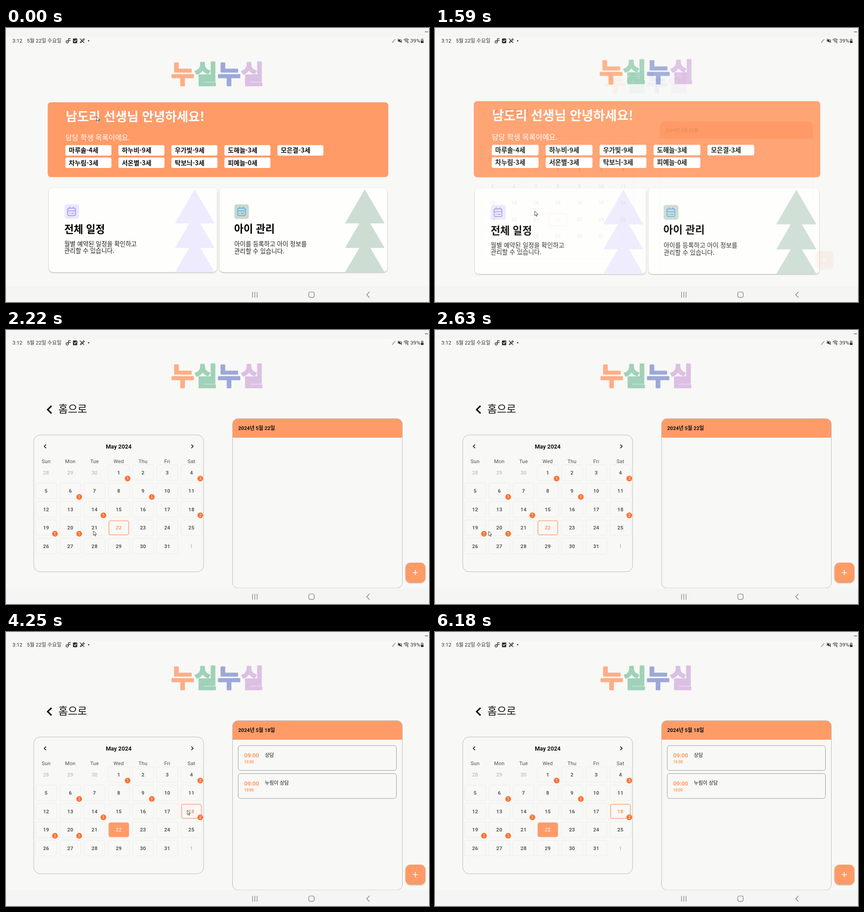
An HTML page that plays this animation: 929x603 px, repeating every 6.58 s.

```html
<!DOCTYPE html>
<html lang="ko">
<head>
<meta charset="utf-8">
<title>일정 관리</title>
<style>
html, body { margin: 0; width: 100%; height: 100%; overflow: hidden; background: #f8f8f6; }
svg { display: block; width: 929px; height: 603px; font-family: Roboto, "Noto Sans CJK KR", sans-serif; }
.ko { font-family: "Noto Sans CJK KR", sans-serif; }
.b { font-weight: 700; }
.mid { text-anchor: middle; }
.line { fill: none; stroke-linecap: round; stroke-linejoin: round; }
.logo { font-size: 55px; font-weight: 900; stroke-width: 3px; stroke-linejoin: round; }
.shadow { filter: drop-shadow(0 1.5px 1.3px #0005); }

.anim { animation: 6580ms step-end infinite; }
#home, #cal { transform-origin: 465px 301px; }
#home { animation-name: leave; }
#cal { animation-name: enter; }
#badges { animation-name: badges; }
.d22 { animation-name: first; }
.d19 { animation-name: second; }
.d18 { animation-name: third; }
.fade.d22 { animation-name: firstFade; }
.fade.d19 { animation-name: secondFade; }
.fade.d18 { animation-name: thirdFade; }
.fade.today { animation-name: todayFade; }
.fade { animation-timing-function: linear; }
#cursor { animation-name: point; }

@keyframes leave { 0% { transform: none } 24.15% { transform: scale(1.0174) } 25.2%, 100% { transform: scale(1.045) } }
@keyframes enter {
  0% { opacity: 0; transform: scale(.85) }
  24.15% { opacity: .1; transform: scale(.899) }
  25.2% { opacity: 1; transform: scale(.983) }
  26.25% { opacity: 1; transform: scale(.995) }
  27.3% { opacity: 1; transform: scale(.999) }
  28.4%, 100% { opacity: 1; transform: none }
}
@keyframes badges { 0% { opacity: 0 } 26.25%, 100% { opacity: 1 } }
@keyframes first { 0% { opacity: 1 } 42.5%, 100% { opacity: 0 } }
@keyframes second { 0% { opacity: 0 } 42.5% { opacity: 1 } 61.35%, 100% { opacity: 0 } }
@keyframes third { 0% { opacity: 0 } 61.35%, 100% { opacity: 1 } }
@keyframes firstFade { 0%, 42.5% { opacity: 1 } 45.7%, 100% { opacity: 0 } }
@keyframes todayFade { 0%, 42.5% { opacity: 0 } 45.7%, 100% { opacity: 1 } }
@keyframes secondFade { 0%, 42.5% { opacity: 0 } 45.7%, 61.35% { opacity: 1 } 64.5%, 100% { opacity: 0 } }
@keyframes thirdFade { 0%, 61.35% { opacity: 0 } 64.5%, 100% { opacity: 1 } }
@keyframes point {
  0% { transform: translate(199px, 195px); opacity: 1 }
  17.75% { transform: translate(199px, 195px); opacity: 1; animation-timing-function: steps(4) }
  22% { transform: translate(219px, 403px); opacity: 1 }
  28.4% { transform: translate(219px, 403px); opacity: 1; animation-timing-function: steps(5) }
  33.7% { transform: translate(192px, 442px); opacity: 1; animation-timing-function: steps(6) }
  40.1% { transform: translate(103px, 443px); opacity: 1 }
  49.65% { transform: translate(103px, 443px); opacity: 1; animation-timing-function: steps(10) }
  60.3% { transform: translate(398px, 392px); opacity: 1 }
  82.5% { transform: translate(398px, 392px); opacity: 1; animation-timing-function: steps(4) }
  86.6% { transform: translate(424px, 404px); opacity: 0 }
  100% { transform: translate(424px, 404px); opacity: 0 }
}
</style>
</head>
<body>
<svg viewBox="0 0 929 603">
  <defs>
    <g id="logo" class="ko logo mid">
      <text x="388" y="120.500" fill="#fdae86" stroke="#fdae86">누</text>
      <text x="439" y="120.500" fill="#9fd2b8" stroke="#9fd2b8">실</text>
      <text x="490" y="120.500" fill="#9ca9d8" stroke="#9ca9d8">누</text>
      <text x="541" y="120.500" fill="#dcc0e4" stroke="#dcc0e4">실</text>
    </g>
    <path id="tree" d="M414.500 355l43.500 75h-31.500l31.500 54h-31.500l31.500 53.500h-87l31.500-53.500h-31.500l31.500-54h-31.500z"/>
    <path id="date" class="line" stroke-width="2.1" d="M138.500 396.500h11a3 3 0 0 1 3 3v10.500a3 3 0 0 1-3 3h-11a3 3 0 0 1-3-3v-10.500a3 3 0 0 1 3-3zM135.500 402.500h17M140 394v3M148 394v3M139.500 408h.8M144 408h4.500"/>
  </defs>

  <rect width="929" height="603" fill="#f8f8f7"/>

  <g id="home" class="anim">
    <use href="#logo"/>
    <rect x="91.600" y="163.500" width="748" height="164.500" rx="7" fill="#ff9b67"/>
    <g class="ko" fill="#fff">
      <text class="b" x="131" y="204.500" font-size="27.600">남도리 선생님 안녕하세요!</text>
      <text x="130.500" y="246.500" font-size="15.600">담당 학생 목록이에요.</text>
    </g>
    <g id="chips" class="ko b" font-size="14"></g>
    <g fill="#fefefd" class="shadow">
      <rect x="94" y="351.500" width="369.500" height="186" rx="9"/>
      <rect x="468.500" y="351.500" width="369" height="186" rx="9"/>
    </g>
    <use href="#tree" fill="#eeebfe"/>
    <use href="#tree" x="373.500" fill="#cdddd3"/>
    <rect x="128.500" y="388" width="32" height="32" rx="5" fill="#ebe8fe"/>
    <rect x="501.500" y="388" width="32" height="32" rx="5" fill="#c9dacf"/>
    <use href="#date" stroke="#aaa2e6"/>
    <use href="#date" x="373.300" stroke="#6eb3e4"/>
    <g class="ko b" font-size="22.500">
      <text x="128" y="451">전체 일정</text>
      <text x="501" y="449.500">아이 관리</text>
    </g>
    <g class="ko" font-size="13.400" fill="#1c1c1c">
      <text x="128" y="479.500">월별 예약된 일정을 확인하고</text>
      <text x="128" y="495">관리할 수 있습니다.</text>
      <text x="501.500" y="480">아이를 등록하고 아이 정보를</text>
      <text x="501.500" y="496">관리할 수 있습니다.</text>
    </g>
  </g>

  <g id="cal" class="anim">
    <rect x="-90" y="-60" width="1110" height="720" fill="#f8f8f6"/>
    <use href="#logo"/>
    <path d="M100 167l-8.500 8.200 8.500 8.300" fill="none" stroke="#111" stroke-width="3.200"/>
    <text class="ko" x="115" y="182" font-size="22.800" font-weight="500" fill="#111">홈으로</text>

    <rect x="61" y="231" width="373" height="301" rx="14" fill="none" stroke="#bbb"/>
    <path d="M88 252l-4 4 4 4M407 252l4 4-4 4" fill="none" stroke="#111" stroke-width="1.700"/>
    <text class="b mid" x="247.500" y="260.500" font-size="12.700" fill="#111">May 2024</text>
    <g id="days" class="mid" font-size="11.200" letter-spacing=".2"></g>
    <g id="marks" class="mid" font-size="11.200" letter-spacing=".2"></g>
    <g id="badges" class="anim mid" font-size="9"></g>

    <path d="M497.500 237v-30a12 12 0 0 1 12-12h349a12 12 0 0 1 12 12v30z" fill="#ff9b67"/>
    <rect x="497.500" y="195" width="373" height="373" rx="12" fill="none" stroke="#bbb"/>
    <g id="agenda"></g>

    <rect class="shadow" x="877.500" y="512" width="43.500" height="44" rx="11" fill="#ff9b67"/>
    <path d="M893.500 534h11M899 528.500v11" stroke="#fff" stroke-width="1.700"/>
  </g>

  <path d="M0 0h929v20H0zM0 568h929v35H0z" fill="#f5f5f3"/>
  <path d="M920 8.500h7" stroke="#555" stroke-width="1.300"/>
  <g fill="#333" font-size="11.400">
    <text x="14" y="32">3:12</text>
    <text x="46" y="32" font-size="11.200">5월 22일 수요일</text>
    <text x="888" y="32" font-size="11.700">39%</text>
    <rect x="147" y="23" width="9.500" height="10.500" rx="1.500"/>
    <circle cx="181.500" cy="28" r="1.500"/>
    <rect x="911" y="24" width="6" height="9" rx="1.300" fill="#999"/>
    <path d="M911 28.500h6v3.500q0 1-1 1h-4q-1 0-1-1z"/>
    <rect x="912.700" y="22.800" width="2.600" height="1.500" fill="#999"/>
    <path d="M860.500 26.500h2.500l3-2.500v8l-3-2.500h-2.500z"/>
  </g>
  <g class="line" stroke="#333" stroke-width="1.300">
    <path d="M149.500 28.300l1.800 1.800 3-3.600" stroke="#fff"/>
    <path d="M137 31v-7.500h4.500M137 27.500h4.500"/>
    <circle cx="134.300" cy="30.500" r="2.500"/>
    <path d="M162.500 23.500l9 9M163 32.500l1.300-3 6.200-6 1.700 1.700-6.200 6z"/>
    <path d="M848.500 32l6-7" stroke="#aaa" stroke-width="2"/>
    <path d="M861 24l8 8M868 25.500q1.500 2.300 0 4.500"/>
    <path d="M874 25.800q5-4 10 0M875.800 28.200q3.200-2.500 6.400 0M877.500 30.500q1.500-1.200 3 0M882.500 29.500v3.500"/>
  </g>
  <g class="line" stroke="#777" stroke-width="1.200">
    <path d="M541.500 581v12M546.500 581v12M551.500 581v12M798 581l-6 6 6 6"/>
    <rect x="665" y="581" width="11.800" height="11.800" rx="3.200"/>
  </g>

  <g id="cursor" class="anim">
    <path d="M0 0v10l2.300-2 1.600 3.500 1.500-.7-1.600-3.400h3.200z" fill="#fff" stroke="#333" stroke-width=".9" stroke-linejoin="round"/>
  </g>
</svg>

<script>
const put = (id, parts) => { document.getElementById(id).innerHTML = parts.join(''); };
const orange = '#ff9b67';

const pupils = ['마루솔-4세', '하누비-9세', '우가빛-9세', '도해늘-3세', '모은결-3세',
  '차누림-3세', '서온별-3세', '탁보늬-3세', '피예늘-0세'];
put('chips', pupils.map((name, i) => {
  const x = 130.5 + i % 5 * 116.4, y = i < 5 ? 257.7 : 285;
  return `<rect x="${x}" y="${y}" width="101" height="23" rx="3.5" fill="#fff"/>
    <text x="${x + 7.5}" y="${y + 16.5}" fill="#111">${name}</text>`;
}));

// Day 1 falls on the fourth cell of the grid.
const place = day => {
  const i = day + 2;
  return [88 + i % 7 * 53.2, 313.6 + Math.floor(i / 7) * 40.5];
};

const heads = ['Sun', 'Mon', 'Tue', 'Wed', 'Thu', 'Fri', 'Sat'].map((name, i) =>
  `<text x="${88 + i * 53.2}" y="293" fill="#4f4f4f">${name}</text>`);
const cells = Array.from({ length: 35 }, (_, i) => {
  const day = i - 2, [x, y] = place(day);
  if (day < 1 || day > 31)
    return `<text x="${x}" y="${y + 4}" fill="#aeaeae">${day < 1 ? day + 30 : day - 31}</text>`;
  return `<rect x="${x - 23}" y="${y - 17}" width="46.500" height="34" rx="4" fill="none" stroke="#ededeb"/>
    <text class="b" x="${x}" y="${y + 4}" fill="#5c5c5c">${day}</text>`;
});
put('days', heads.concat(cells));

const mark = (day, cls, fill, ink) => {
  const [x, y] = place(day);
  return `<g class="anim fade ${cls}">
    <rect x="${x - 21.5}" y="${y - 15.2}" width="43.300" height="30.700" rx="3.500" fill="${fill}" stroke="${orange}" stroke-width="1.300"/>
    <text x="${x}" y="${y + 4}" fill="${ink}" font-weight="${cls === 'today' ? 400 : 700}">${day}</text></g>`;
};
put('marks', [
  mark(22, 'today', orange, '#fff'),
  ...[22, 19, 18].map(day => mark(day, 'd' + day, '#f8f8f6', orange))
]);

const counts = { 1: 1, 4: 3, 6: 1, 9: 1, 14: 1, 18: 2, 19: 1, 20: 1 };
put('badges', Object.entries(counts).map(([day, n]) => {
  const [x, y] = place(+day);
  return `<circle cx="${x + 19.5}" cy="${y + 13.3}" r="6.300" fill="#fd7333"/>
    <text x="${x + 19.5}" y="${y + 16.5}" fill="#fff">${n}</text>`;
}));

const agenda = {
  22: [],
  19: [['11:00', '12:00', '마루솔 수업']],
  18: [['09:00', '10:00', '상담'], ['09:00', '10:00', '누림이 상담']]
};
put('agenda', Object.entries(agenda).map(([day, items]) =>
  `<g class="anim d${day}"><text class="b" x="510" y="219.800" font-size="11.100" fill="#111">2024년 5월 ${day}일</text>` +
  items.map(([from, to, title], i) => `<g transform="translate(0 ${i * 61.6})">
    <rect x="510" y="250" width="347.500" height="54.700" rx="5" fill="none" stroke="#999"/>
    <text class="b" x="523" y="276" font-size="12.700" fill="${orange}">${from}</text>
    <text class="b" x="523" y="289.300" font-size="8.200" fill="${orange}">${to}</text>
    <text class="ko" x="568.500" y="274.800" font-size="10.800" font-weight="500" fill="#111">${title}</text></g>`).join('') +
  '</g>'));
</script>
</body>
</html>
```
